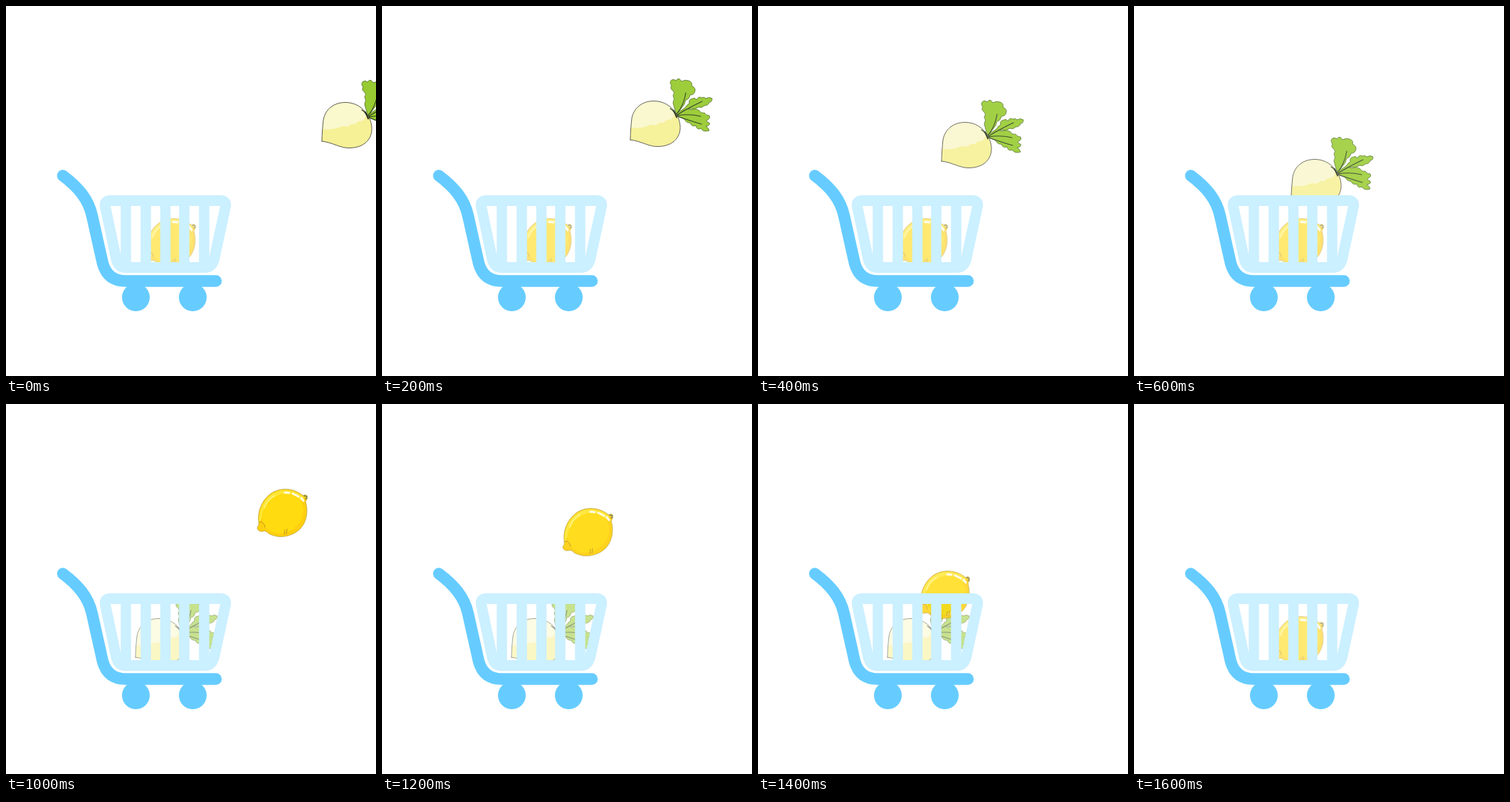
These frames come from a looping animation (520x520 px, 1800 ms). An HTML page without scripts:

```html
<!DOCTYPE html>
<html lang="en">
<head>
<meta charset="utf-8">
<title>Shopping cart</title>
<style>
  html, body { margin: 0; width: 100%; height: 100%; overflow: hidden; background: #fff; }
  svg { display: block; width: 100%; height: 100%; }
  .item { animation: 1800ms step-end infinite; }
  .turnip { animation-name: turnip; }
  .lemon { animation-name: lemon; }

  @keyframes turnip {
    0%      { transform: translate(186px, -28px); opacity: 1; }
    11.11%  { transform: translate(91px, -30px); opacity: .95; }
    22.22%  { transform: none; opacity: .9; }
    33.33%  { transform: translate(-37px, 52px); opacity: .86; }
    44.44%  { transform: translate(-76px, 138px); opacity: .55; }
    88.88%, 100% { transform: translate(-76px, 138px); opacity: 0; }
  }
  @keyframes lemon {
    0%      { transform: translate(-58px, 152px); opacity: .56; }
    44.44%  { transform: translate(183px, -6px); opacity: 1; }
    55.55%  { transform: translate(99px, -27px); opacity: .94; }
    66.66%  { transform: none; opacity: .88; }
    77.77%  { transform: translate(-27px, 88px); opacity: .78; }
    88.88%, 100% { transform: translate(-58px, 152px); opacity: .56; }
  }
</style>
</head>
<body>
<svg viewBox="0 0 520 520" fill="none" stroke-linecap="round" stroke-linejoin="round">
  <g class="item turnip">
    <g fill="#98cb31" stroke="#4c6a22" stroke-width=".8">
      <path d="M322 180L318 166Q321 160 318 156Q321 152 318 149Q313 146 316 142Q312 137 316 134Q319 132 322 135Q326 129 330 136Q335 133 340 135Q346 137 344 142Q350 145 349 149Q348 155 342 155Q341 161 336 162L334 168L325 180Z"/>
      <path d="M323 181L335 173Q338 168 341 167Q339 161 346 160Q349 158 351 162Q354 156 358 159Q362 157 364 160Q369 157 373 160Q373 165 369 165Q368 170 362 170Q359 174 354 172Q349 176 342 174L324 184Z"/>
      <path d="M323 184L334 189Q337 195 342 194Q344 200 350 198Q352 205 357 202Q361 208 369 205Q367 200 364 199Q371 198 369 194Q364 193 366 190Q371 188 369 184Q364 184 362 180Q357 181 355 177Q349 173 344 176Q338 173 333 177Z"/>
    </g>
    <path d="M258 218C258 208 259 198 260 188C263 172 276 163.5 291 163.5C305 163.5 316 171 322 181C327 188 328.5 197 328 203C327 215 318 227 297 227.5C284 228 274 220 258 218Z" fill="#f6f196"/>
    <path d="M259 201L260 188C263 172 276 163.5 291 163.5C304 163.5 314 170 320 179Q320 187 314 190Q309 189 305 194Q299 193 294 198Q286 195 279 200Q269 202 259 201Z" fill="#faf8cd"/>
    <path d="M258 218C258 208 259 198 260 188C263 172 276 163.5 291 163.5C305 163.5 316 171 322 181C327 188 328.5 197 328 203C327 215 318 227 297 227.5C284 228 274 220 258 218Z" stroke="#4a4a42" stroke-width=".9"/>
    <path d="M314 174Q320 177 323 187M323 182Q333 170 336 152M324 183Q338 174 359 164M324 184Q340 181 357 185M324 185Q338 190 358 196" stroke="#2c3a1c" stroke-width="1.1"/>
    <path d="M319 177L323 186" stroke="#20281a" stroke-width="1.8"/>
  </g>

  <g class="item lemon">
    <path d="M319 156Q322 153 324 156Q325 161 322 164C326 177 324 192 315 202C303 214 284 217 270 209Q266 204 262 206Q255 207 254 201Q257 197 256 192C254 174 264 157 278 150C291 144 307 146 319 156Z" fill="#fc0" stroke="#9c8a28" stroke-width=".6"/>
    <path d="M257 194C255 174 265 158 279 151C293 145 308 148 320 158L314 163C296 150 270 158 262 184Z" fill="#ffe526"/>
    <ellipse cx="290" cy="181" rx="31" ry="26" transform="rotate(-38 290 181)" fill="#ffd900"/>
    <path d="M293 151.500L299 152M304 153L312 157M316 159L319 163" stroke="#fffbe0" stroke-width="3"/>
    <path d="M264 173Q268 161 278 156" stroke="#fff06a" stroke-width="2"/>
    <path d="M257 193Q264 192 265 200M293 204L292 210M296 203L295 210" stroke="#b58a10" stroke-width=".9"/>
    <path d="M320 156L324 157M322 160L324 159" stroke="#6b7040" stroke-width="1.4"/>
  </g>

  <g stroke="#cbf0ff" stroke-width="15">
    <path d="M146 273.500H302Q310 274 308.500 282L292.500 356Q289 367.500 279 367.500H168Q158 367.500 155 356L139.500 282Q138 274 146 273.500Z"/>
    <path d="M168.500 274V367M196.500 274V367M224 274V367M250.500 274V367M278.500 274V367" stroke-width="14.500" stroke-linecap="butt"/>
  </g>
  <path d="M80 238.500C102 255 116 272 121 295L136 362Q143 386.500 168 386.500H295" stroke="#6cf" stroke-width="16.500"/>
  <g fill="#6cf">
    <circle cx="182.500" cy="409.500" r="19.500"/>
    <circle cx="262.500" cy="409.500" r="19.500"/>
  </g>
</svg>
</body>
</html>
```
